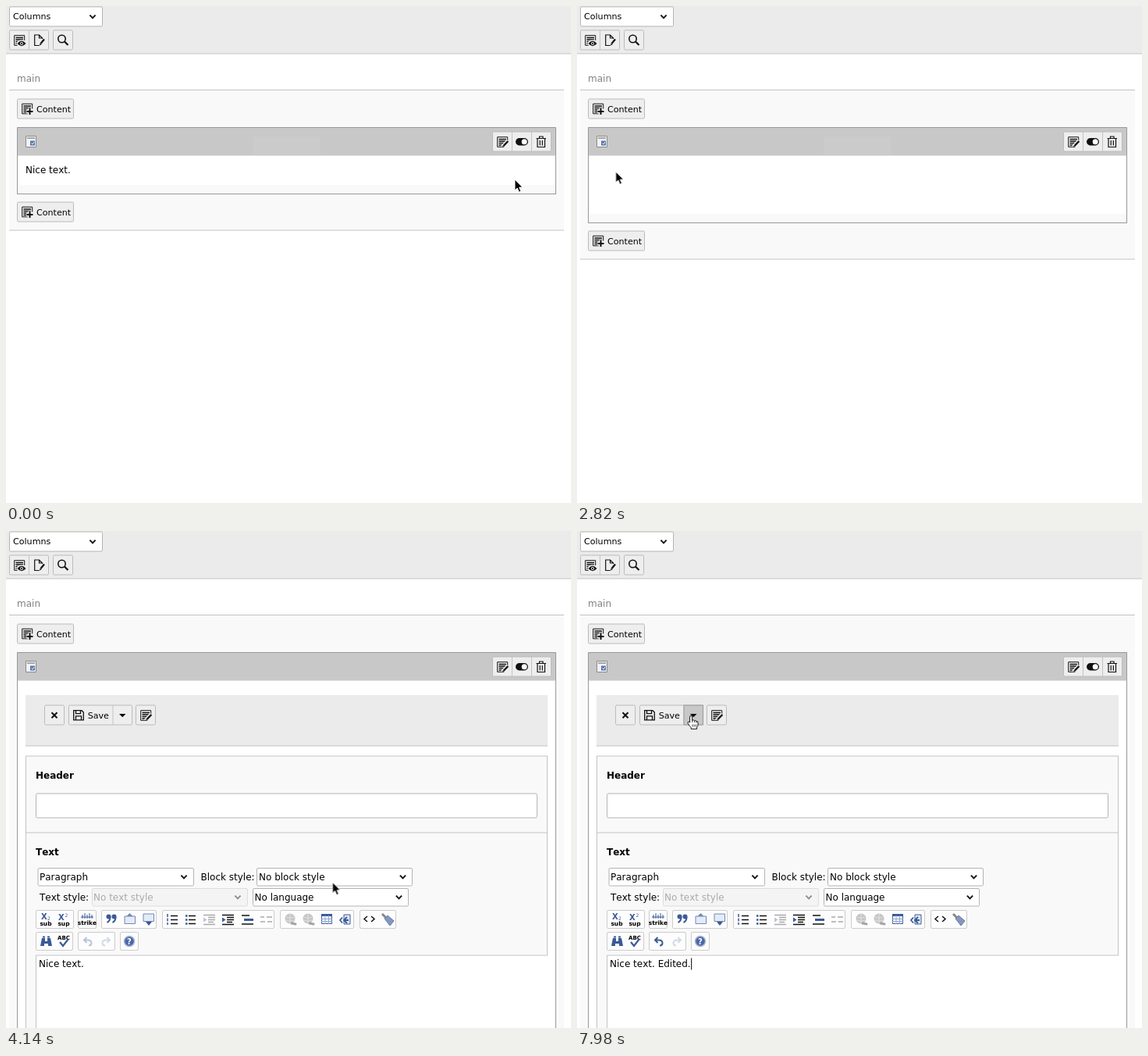
Recreate the animation shown at these times as an HTML page. Size 724 px wide and 636 px high, loop 8000 ms.

```html
<!DOCTYPE html>
<html lang="en">
<head>
<meta charset="utf-8">
<title>Inline content editing</title>
<style>
html, body { margin: 0; width: 100%; height: 100%; overflow: hidden; background: #fff; }
svg { display: block; }
text { font: 12px "DejaVu Sans", Verdana, sans-serif; font-kerning: none; fill: #000; white-space: pre; }
.s { font-size: 11.1px; }
.b { font-weight: bold; }
.tiny { font-size: 7.5px; font-weight: bold; text-anchor: middle; }
.blue { fill: #3a5a98; }
.line { fill: none; stroke: #c3c3c3; }
.btn { fill: #eee; stroke: #bbb; }
.field { fill: #fff; stroke: #b4b4b4; }
.tool { fill: #fdfdfd; stroke: #ccc; }
.ink { fill: none; stroke: #111; }
.pen { fill: none; stroke: #3a5a98; }
.dim { opacity: .35; }

.t { animation: 8s step-end infinite; }
.view { animation-name: view; }
.form { animation-name: form; }
.load { animation-name: load; }
.edit { animation-name: edit; }
.tip { animation-name: tip; }
.undo { animation-name: undo; }
.hover { animation-name: hover; }
.arrow { animation-name: arrow; }
.hand { animation-name: hand; }
.beam { animation-name: beam; }
.type { animation-name: type; }
.caret { animation-name: caret; }
.low { animation: grow 8s linear infinite; }
.fade { animation: fade 8s linear infinite; }
.spin { animation: spin .8s steps(12) infinite; }
.cursor { animation: move 8s ease-in-out infinite; }

@keyframes view { 0% { opacity: 1 } 39%, 100% { opacity: 0 } }
@keyframes form { 0% { opacity: 0 } 39%, 100% { opacity: 1 } }
@keyframes load { 0% { opacity: 1 } 46.5%, 100% { opacity: 0 } }
@keyframes edit { 0% { opacity: 0 } 46.5%, 100% { opacity: 1 } }
@keyframes tip { 0% { opacity: 0 } 30.75% { opacity: 1 } 33%, 100% { opacity: 0 } }
@keyframes undo { 0% { opacity: .35 } 68.25%, 100% { opacity: 1 } }
@keyframes hover { 0% { opacity: 0 } 99%, 100% { opacity: 1 } }
@keyframes arrow {
  0% { opacity: 1 } 11.25% { opacity: 0 } 33% { opacity: 1 } 55.5% { opacity: 0 }
  93.2% { opacity: 1 } 98.5%, 100% { opacity: 0 }
}
@keyframes hand { 0% { opacity: 0 } 11.25% { opacity: 1 } 33% { opacity: 0 } 98.5%, 100% { opacity: 1 } }
@keyframes beam {
  0% { opacity: 0 } 55.5% { opacity: 1 } 63% { opacity: 0 }
  92.25% { opacity: 1 } 93.2%, 100% { opacity: 0 }
}
@keyframes grow { 0%, 32.25% { transform: none } 35.25%, 100% { transform: translateY(37px) } }
@keyframes fade { 0%, 32.25% { opacity: 1 } 35.25%, 100% { opacity: 0 } }
@keyframes spin { to { transform: rotate(360deg) } }
@keyframes type {
  0% { transform: translateX(100px) } 63% { transform: translateX(103.7px) }
  67.5% { transform: translateX(111.3px) } 70.5% { transform: translateX(118.9px) }
  71.25% { transform: translateX(122.2px) } 73.5% { transform: translateX(126.9px) }
  75% { transform: translateX(134.3px) } 75.75% { transform: translateX(141.9px) }
  77.25%, 100% { transform: translateX(146px) }
}
@keyframes caret {
  0% { opacity: 0 } 57% { opacity: 1 } 83.25% { opacity: 0 } 88.5% { opacity: 1 }
  93.75% { opacity: 0 } 99%, 100% { opacity: 1 }
}
@keyframes move {
  0%, .4% { transform: translate(652px, 222px) }
  6.75%, 10% { transform: translate(88px, 213px); animation-timing-function: linear }
  13.5% { transform: translate(61px, 205px) }
  15.4% { transform: translate(32px, 212px) }
  17.25%, 43.5% { transform: translate(49.6px, 212px) }
  49.4% { transform: translate(431px, 429px); animation-timing-function: linear }
  51.75% { transform: translate(419px, 449px); animation-timing-function: ease-out }
  57%, 92.2% { transform: translate(275px, 573px); animation-timing-function: step-end }
  92.25% { transform: translate(152px, 572px); animation-timing-function: linear }
  93.75% { transform: translate(95px, 500px); animation-timing-function: linear }
  95.25% { transform: translate(72px, 390px); animation-timing-function: linear }
  96.75% { transform: translate(92px, 300px); animation-timing-function: linear }
  98.25% { transform: translate(131px, 250px); animation-timing-function: ease-out }
  99.6%, 100% { transform: translate(146px, 237px) }
}
</style>
</head>
<body>
<svg width="724" height="636" viewBox="0 0 724 636">
<defs>
  <g id="doc" class="ink">
    <path d="M13.7 7V.7H.7v12.6H8"/>
    <path d="M2.5 3.5h9.5M2.5 6h9.5M2.5 8.5h7M2.5 11h5" stroke-width="1.3"/>
  </g>
  <g id="docEdit">
    <use href="#doc"/>
    <path d="M14.5 5.5L7 13.5" stroke="#eee" stroke-width="5"/>
    <path d="M14.3 6L8.5 12" stroke="#111" stroke-width="2.4"/>
    <path d="M7 14l.6-2.6 2 2z" fill="#111"/>
  </g>
  <g id="content">
    <rect class="btn" x=".5" y=".5" width="72" height="25" rx="1.5"/>
    <use href="#doc" x="6" y="6"/>
    <path d="M16.5 12v9M12 16.5h9" stroke="#eee" stroke-width="5"/>
    <path d="M16.5 12.5v8M12.5 16.5h8" stroke="#111" stroke-width="2"/>
    <text class="s" x="25" y="17">Content</text>
  </g>
  <path id="chev" d="M-3.6-1.8L0 1.8 3.6-1.8" fill="none" stroke="#111" stroke-width="1.9"/>
  <g id="globe">
    <circle cx="-1" cy="-1" r="6.5" fill="#c6c6c6"/>
    <path d="M-6-3q5 3 10 0M-6 1q5 3 10 0M-1-7v12" fill="none" stroke="#e2e2e2"/>
    <path d="M1 5l5 1" stroke="#a4a4a4" stroke-width="3" stroke-linecap="round"/>
  </g>
  <path id="turn" class="pen" d="M-5-1.5h5q4.5 0 4.5 3.7 0 3.3-3.5 3.3M-1.5-5L-5-1.5-1.5 2" stroke-width="2"/>
  <path id="spoke" d="M0-15v6.5" stroke-width="3.4" stroke-linecap="round"/>
</defs>

<!-- page header -->
<rect width="724" height="61" fill="#ebebeb"/>
<path class="line" d="M0 61h724"/>
<rect class="field" x="4.5" y="1" width="119" height="25" rx="1.5"/>
<text class="s" x="9" y="17.3">Columns</text>
<use href="#chev" x="111" y="13.5"/>
<rect class="btn" x="4.5" y="31" width="50" height="25" rx="1.5"/>
<path class="line" d="M29.5 31v25"/>
<rect class="btn" x="60.5" y="31" width="25" height="25" rx="1.5"/>
<use href="#doc" x="10" y="37"/>
<ellipse cx="20" cy="48" rx="6.5" ry="4.5" fill="#eee"/>
<path d="M14.5 48q5.5-6.5 11 0q-5.5 6.5-11 0z" fill="#111"/>
<circle cx="20" cy="48" r="2" fill="#eee"/><circle cx="20" cy="48" r="1"/>
<path class="ink" d="M46.5 42v-1l-4-4h-5.8v13.500h6M42.500 37v4h4" stroke-width="1.2"/>
<path d="M49 42.500L44.500 48" stroke="#111" stroke-width="2.200"/>
<path d="M43 50.500l.6-3 2 1.700z" fill="#111"/>
<circle class="ink" cx="71.5" cy="42" r="4.7" stroke-width="1.6"/>
<path d="M75 45.5l4.5 4.5" stroke="#111" stroke-width="2.2"/>

<!-- column -->
<text x="14" y="97" style="fill:#808080">main</text>
<rect class="t form" x="4" y="108" width="711" height="528" fill="#f9f9f9"/>

<g class="t view">
  <g class="low">
    <rect x="4" y="108" width="711" height="179" fill="#f9f9f9"/>
    <path class="line" d="M4 287h711"/>
    <rect x="14.5" y="120.5" width="690" height="120" fill="#fff" stroke="#999"/>
    <rect x="15" y="229" width="689" height="11" fill="#f9f9f9"/>
    <use href="#content" x="14" y="250.5"/>
  </g>
  <rect x="4" y="108" width="711" height="47" fill="#f9f9f9"/>
  <text class="fade" x="25" y="214.3">Nice text.</text>
</g>
<path class="line" d="M4 107.5h711"/>
<use href="#content" x="14" y="118.5"/>

<g class="t form">
  <rect x="14.5" y="155.5" width="690" height="490" fill="#fff" stroke="#999"/>
  <rect x="25" y="210" width="669" height="65" fill="#ebebeb"/>
  <path class="line" d="M25 275h669"/>
  <rect class="btn" x="49.5" y="223" width="25" height="25" rx="1.5"/>
  <path d="M58.5 232.3l7 7m0-7l-7 7" stroke="#111" stroke-width="2"/>
  <rect class="btn" x="80.5" y="223" width="81" height="25" rx="1.5"/>
  <path class="line" d="M137 223v25"/>
  <rect class="t hover" x="137" y="223" width="24.5" height="25" fill="#c8c8c8" stroke="#999"/>
  <path d="M145 234h8.5l-4.250 4.300z"/>
  <path class="ink" d="M86.700 229.700h10.300l2.300 2.300v9.800H86.700zM89.500 230v3.700h6V230M89.500 241.500v-4.700h7v4.700" stroke-width="1.3"/>
  <text class="s" x="104.7" y="239.5">Save</text>
  <rect class="btn" x="166.5" y="223" width="25" height="25" rx="1.5"/>
  <use href="#docEdit" x="172" y="229"/>

  <rect x="25.5" y="288" width="668" height="360" fill="#f9f9f9" stroke="#c3c3c3"/>
  <path class="line" d="M25 386h669"/>
  <text class="b" x="38" y="316.5">Header</text>
  <rect class="field" x="38.5" y="336" width="642" height="31" rx="1.5"/>
  <text class="b" x="38" y="414.5">Text</text>

  <g class="t load">
    <g transform="translate(64 482)"><g class="spin" id="spinner"></g></g>
    <text class="s" x="88" y="486.5" style="fill:#555">The editor is being loaded. Please wait...</text>
  </g>

  <g class="t edit">
    <rect class="field" x="41" y="431.5" width="199.5" height="22.5" rx="1.5"/>
    <text x="43" y="446.5">Paragraph</text>
    <use href="#chev" x="228" y="442.5"/>
    <text x="249.5" y="446.5">Block style:</text>
    <rect class="field" x="321.5" y="431.5" width="199" height="22.5" rx="1.5"/>
    <text x="324" y="446.5">No block style</text>
    <use href="#chev" x="508.5" y="442.5"/>
    <text x="43" y="472.5">Text style:</text>
    <rect x="110.5" y="457.5" width="199" height="22.5" rx="1.5" fill="#f4f4f4" stroke="#ddd"/>
    <text x="112" y="472.5" style="fill:#aaa">No text style</text>
    <use href="#chev" x="297" y="468.5" opacity=".45"/>
    <rect class="field" x="316.5" y="457.5" width="199" height="22.5" rx="1.5"/>
    <text x="318.5" y="472.5">No language</text>
    <use href="#chev" x="503.5" y="468.5"/>

    <g id="tools"></g>

    <text class="b blue" x="45" y="497" style="font-size:10px">X</text>
    <text class="blue" x="53" y="498" style="font-size:6px">2</text>
    <text class="tiny" x="51" y="504.5">sub</text>
    <text class="b blue" x="67" y="498" style="font-size:10px">X</text>
    <text class="blue" x="75.5" y="494" style="font-size:6px">2</text>
    <text class="tiny" x="74" y="504.5">sup</text>
    <path class="pen" d="M96 494h16M98 491v5M101 489v7M104 491v5M107 489v7M110 491v5"/>
    <text class="tiny" x="104" y="504">strike</text>

    <g class="blue">
      <circle cx="131.5" cy="493.5" r="3"/><circle cx="138.5" cy="493.5" r="3"/>
    </g>
    <path class="pen" d="M133.5 494q0 5-4 7M140.5 494q0 5-4 7" stroke-width="2"/>
    <path d="M152 493h13.5v9.5H152z" fill="#e4ebf7" stroke="#7288b5"/>
    <path d="M154.5 493l4-4 4 4z" fill="#7288b5"/>
    <path d="M176 490h13.5v9.5H176z" fill="#e4ebf7" stroke="#7288b5"/>
    <path d="M179 500h8l-4 5z" class="blue"/>

    <path class="ink" d="M211 492.5h9M211 497.5h9M211 502.5h9M234 492.5h9M234 497.5h9M234 502.5h9" stroke-width="1.3"/>
    <path class="pen" d="M207 490v4M207 495.5v4M207 501v3" stroke-width="1.5"/>
    <path class="pen" d="M230 492.5h2.5m-2.5 5h2.5m-2.5 5h2.5" stroke-width="2.5"/>
    <g id="dent">
      <path class="ink" d="M277 491.5h15M283 494.5h9M283 497.5h9M283 500.5h7M277 503.5h15" stroke-width="1.4"/>
      <path d="M277 494.5l4.5 3-4.5 3z" class="blue"/>
    </g>
    <use href="#dent" x="-24" class="dim"/>
    <path class="ink" d="M302 492h10M302 503h15" stroke-width="1.4"/>
    <path class="pen" d="M305 497.5h12" stroke-width="3"/>
    <path class="ink dim" d="M326 494h5m3 0h7M326 500h6m3 0h6" stroke-width="1.4"/>

    <use href="#globe" x="365" y="497"/>
    <use href="#globe" x="388" y="497"/>
    <path class="pen" d="M404.5 490.5h13v12h-13z" style="fill:#fff"/>
    <path class="pen" d="M404 491.5h14" stroke-width="3"/>
    <path d="M404 496.5h14M404 499.5h14M409 492v11M413.5 492v11" stroke="#8da3cf"/>
    <path class="pen" d="M433 491h8v12h-8z" style="fill:#dfe7f5"/>
    <path class="pen" d="M437 494l-4 4 4 4M431 494.5l-3 3.500 3 3.500M434 498h5" stroke-width="1.8"/>
    <path class="ink" d="M463 493l-4 3.5 4 3.5M468 493l4 3.5-4 3.5" stroke-width="1.5"/>
    <path d="M482 490l5 5" stroke="#888" stroke-width="3"/>
    <path d="M485 496l4-4 8 7-5 6z" fill="#8497bd" stroke="#6479a6"/>

    <path d="M44 531l2-10h4v4h3v-4h4l2 10h-5v-3h-5v3z" class="blue"/>
    <path class="pen" d="M47 519.5h3m3 0h3" stroke-width="2"/>
    <text class="tiny" x="74" y="523" style="font-size:7px">ABC</text>
    <path class="pen" d="M69 526l4 5 7-9" stroke-width="2.2"/>
    <use class="t undo" href="#turn" x="105" y="525"/>
    <g class="dim" transform="translate(128 525) scale(-1 1)"><use href="#turn" opacity=".6"/></g>
    <circle cx="158" cy="525" r="6.5" fill="#4a68a8" stroke="#a9b7d6" stroke-width="1.5"/>
    <text class="b" x="158" y="529" style="font-size:10px;fill:#fff;text-anchor:middle">?</text>

    <rect x="38" y="543" width="666" height="93" fill="#fff"/>
    <path class="line" d="M694 543H38.5V636"/>
    <text x="42" y="558.3">Nice text. Edited.</text>
    <g class="t type">
      <rect y="546" width="60" height="18" fill="#fff"/>
      <path class="t caret" d="M.7 546.5v15" stroke="#000"/>
    </g>
  </g>
</g>

<!-- panel header -->
<rect x="14" y="155" width="691" height="36.5" fill="#c8c8c8"/>
<path d="M14.5 192v-36.5h690V192" fill="none" stroke="#999"/>
<rect class="t view" x="316" y="167" width="87" height="24" fill="#cbcbcb"/>
<path d="M25.5 166.5h13v14h-13z" fill="#f2f2f2" stroke="#8a8a8a"/>
<path d="M27 169h10" stroke="#a8a8a8" stroke-width="2"/>
<path d="M31 172.5h6v6h-6z" fill="#5578b4"/>
<path d="M32.5 175.5l1.5 1.5 2-3" fill="none" stroke="#fff"/>
<rect class="btn" x="623.5" y="161" width="75" height="25" rx="1.5"/>
<path class="line" d="M648.5 161v25M673.5 161v25"/>
<use href="#docEdit" x="629" y="167"/>
<rect x="653" y="169" width="16" height="9.5" rx="4.75" fill="#111"/>
<circle cx="664.2" cy="173.75" r="3.5" fill="#fff"/>
<path class="ink" d="M679.5 169.5h12.5M683.5 169v-2h4.5v2M681 170v10.5h9.5V170M684.2 172v6.5M687.3 172v6.5" stroke-width="1.2"/>

<g class="t tip">
  <rect x="49.5" y="231.5" width="35" height="21" fill="#ececec" stroke="#c8c8c8"/>
  <text class="s" x="56" y="246">Edit</text>
</g>

<g class="cursor">
  <path class="t arrow" d="M0 0V14L3.2 11 5.4 16.2 7.9 15.1 5.7 10.1H10Z" fill="#000" stroke="#fff"/>
  <g class="t hand" stroke="#111" fill="none">
    <path fill="#fff" d="M-1.4 8V1Q-1.4-.6 .1-.6T1.6 1V5.2Q3.6 4.2 4.4 5.8 6.2 5 7 6.6 9 6 9 8.4V11Q9 13 7.6 14.2V16.3H.2V14.6Q-1.6 13-3.6 9.6-4.6 7.8-3.4 7.2-2.4 6.8-1.4 8Z"/>
    <path d="M1.7 5v3M4.4 6v2M6.9 7v1.5M2 10.5v3M4.2 10.5v3M6.4 10.5v3" stroke-width=".8"/>
  </g>
  <path class="t beam" d="M-3-7.5q3 0 3 2 0-2 3-2M0-5.5v11M-3 7.5q3 0 3-2 0 2 3 2" fill="none" stroke="#222"/>
</g>
</svg>
<script>
const add = (parent, tag, attrs) => {
  const el = document.createElementNS("http://www.w3.org/2000/svg", tag);
  for (const k in attrs) el.setAttribute(k, attrs[k]);
  document.getElementById(parent).append(el);
};

// spinner spokes fade behind the leading one
for (let i = 0; i < 12; i++) {
  const light = Math.min(205, 118 + i * 22);
  add("spinner", "use", {
    href: "#spoke",
    transform: `rotate(${30 - i * 30})`,
    stroke: `rgb(${light},${light},${Math.min(208, light + 22)})`
  });
}

// editor button groups: left, right, top
[[38, 87, 485], [92, 116, 485], [122, 193, 485], [200, 344, 485], [351, 446, 485], [453, 500, 485],
 [38, 86, 513], [92, 140, 513], [146, 170, 513]].forEach(([l, r, y]) =>
  add("tools", "rect", { class: "tool", x: l + .5, y: y + .5, width: r - l - 1, height: 23, rx: 1.5 }));
</script>
</body>
</html>
```
